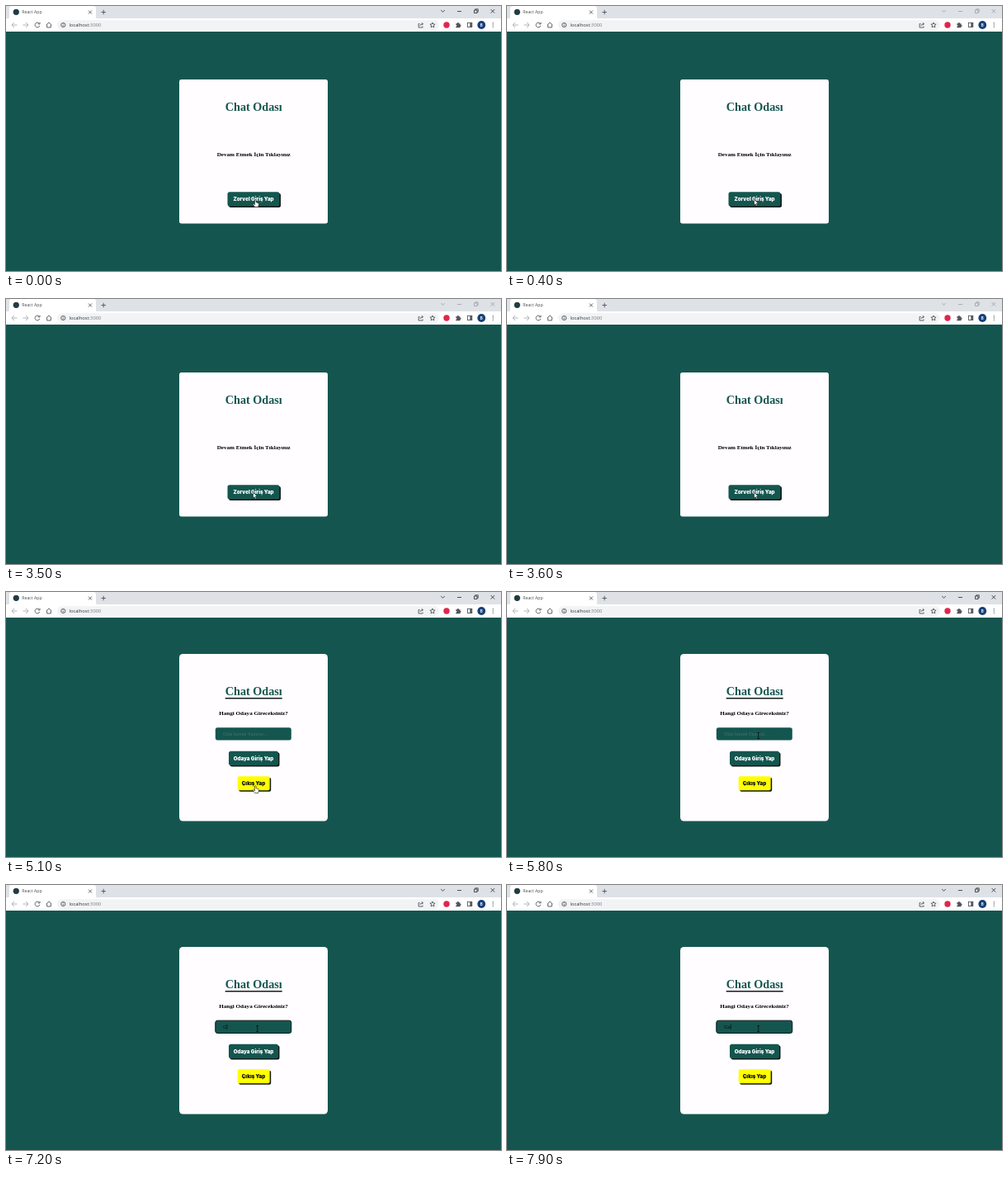
Write an HTML page that moves like this. It is 600 by 321 pixels and loops after 8000 ms.

```html
<!DOCTYPE html>
<html lang="tr">
<head>
<meta charset="utf-8">
<title>Chat Odası</title>
<style>
  html, body { margin: 0; width: 100%; height: 100%; overflow: hidden; background: #14564f; }
  svg { display: block; width: 600px; height: 321px; }
  .ui { font-family: "Open Sans", "Noto Sans", sans-serif; }
  .serif { font: bold 7.1px "Liberation Serif", "Times New Roman", serif; text-anchor: middle; }
  .title { font-size: 14.2px; fill: #14564f; }
  .button { font: 900 6.2px Inter, sans-serif; text-anchor: middle; fill: #fff; }
  .field { font: 5.93px "Liberation Sans", Arial, sans-serif; }
  .line { fill: none; stroke: #50545a; stroke-width: .9; }
</style>
</head>
<body>
<svg viewBox="0 0 600 321">
  <rect width="600" height="321" fill="#14564f"/>

  <!-- Browser frame -->
  <g class="ui">
    <rect width="600" height="16" fill="#dee1e6"/>
    <path d="M1 16Q4 16 4 13V3Q4 0 7 0H106Q109 0 109 3V13Q109 16 112 16Z" fill="#fff"/>
    <rect y="15" width="600" height="16" fill="#fff"/>
    <circle cx="12.3" cy="7.3" r="3.6" fill="#203c42"/>
    <text x="19.3" y="9.4" font-size="5.2" fill="#4a4d51">React App</text>
    <path class="line" d="M100 5.5l4 4m0-4l-4 4M115.5 7.5h5.4m-2.7-2.7v5.4"/>
    <g id="controls" class="line">
      <path d="M527.2 5l2.3 2.3L531.800 5M547 6.500h5M567.500 5h3.500v3.500h-3.500zM568.700 5V3.800h3.500v3.500H571M587.600 4l4.600 4.600m0-4.600l-4.600 4.600"/>
    </g>
    <g class="line">
      <path stroke="#a9acb0" d="M13.500 23H7m3-3l-3 3 3 3M20.500 23H27m-3-3l3 3-3 3"/>
      <path d="M40.300 21.200a2.900 2.900 0 1 0 .5 2.700M41 19.700v2.200h-2.300M48.700 23l3.300-3 3.300 3M49.700 22.500V26h4.600V22.500"/>
    </g>
    <rect x="62" y="17.300" width="463" height="11.500" rx="5.750" fill="#f1f3f4"/>
    <circle class="line" cx="69.300" cy="23" r="2.600" stroke-width=".7"/>
    <path class="line" d="M69.300 22.700v1.900m0-3.400v.7" stroke-width=".7"/>
    <text x="76.500" y="25" font-size="5.750" fill="#303236">localhost<tspan fill="#777b80">:3000</tspan></text>
    <g class="line" stroke-width=".8">
      <path d="M501.500 21.500h-1.400V26h5v-1.400M501.800 24q.3-2.300 3.600-2.300m-1.500-1.500l1.600 1.500-1.600 1.500"/>
      <path d="M517 20l.9 2 2.200.2-1.700 1.500.5 2.200-1.900-1.200-1.900 1.200.5-2.200-1.700-1.500 2.200-.2z"/>
      <rect x="559.400" y="20.300" width="5.400" height="5.200"/>
    </g>
    <path d="M562.300 20.300h2.500v5.200h-2.500z" fill="#50545a"/>
    <circle cx="534" cy="23" r="3.700" fill="#e0264d"/>
    <path d="M545.300 21.200h1.500a1.100 1.100 0 0 1 2.200 0h1.500v1.500a1.100 1.100 0 0 1 0 2.200v1.300h-5.200v-1.300a1 1 0 0 0 0-2.200z" fill="#50545a"/>
    <circle cx="576.300" cy="23" r="4.900" fill="#173f78"/>
    <text x="576.300" y="24.800" font-size="5" font-weight="bold" fill="#dfe7f2" text-anchor="middle">B</text>
    <g fill="#50545a"><circle cx="590.300" cy="20.700" r=".65"/><circle cx="590.300" cy="23" r=".65"/><circle cx="590.300" cy="25.300" r=".65"/></g>
  </g>

  <g id="login">
    <rect x="210" y="89" width="180" height="174.500" rx="2.700" fill="#fffdff"/>
    <text class="serif title" x="300.300" y="127">Chat Odası</text>
    <text class="serif" x="300.200" y="182.300">Devam Etmek İçin Tıklayınız</text>
    <rect x="270" y="226.700" width="63" height="17.300" rx="2.500" fill="#101816"/>
    <rect x="268.500" y="225.200" width="63" height="17.300" rx="2.500" fill="#14564f"/>
    <text class="button" x="300" y="236.200">Zorvel Giriş Yap</text>
  </g>

  <g id="room">
    <rect x="210" y="75" width="180" height="202.500" rx="4.500" fill="#fffdff"/>
    <text class="serif title" x="300.300" y="125">Chat Odası</text>
    <rect x="265.700" y="128" width="69" height="1.500" fill="#141c1b"/>
    <text class="serif" x="300" y="149">Hangi Odaya Gireceksiniz?</text>
    <rect id="input" x="253.800" y="164.200" width="92" height="15.300" rx="2.500" fill="#14564f"/>
    <text id="entry" class="field" x="263" y="173.800"></text>
    <rect id="caret" y="168.500" width=".7" height="6.400" fill="#071210"/>
    <rect x="271.500" y="194.200" width="60" height="17.200" rx="2.500" fill="#101816"/>
    <rect x="270" y="192.700" width="60" height="17.200" rx="2.500" fill="#14564f"/>
    <text class="button" x="300" y="203.700">Odaya Giriş Yap</text>
    <rect x="282.200" y="224.800" width="39" height="17" rx="2" fill="#101816"/>
    <rect x="280.700" y="223.300" width="39" height="17" rx="2" fill="#ff0"/>
    <text class="button" x="300" y="234.200" style="fill:#111">Çıkış Yap</text>
  </g>

  <!-- Each pointer has its hot spot at 0,0 -->
  <g id="pointer" stroke="#111" stroke-width=".6" stroke-linejoin="round">
    <path id="hand" fill="#fff" d="M-.8.500Q0-.500.800.500V3.300L3.700 4.200Q4.300 4.500 4.200 5.500L3.500 9H-.7L-3 5.800Q-2.900 4.500-1.800 5.200L-.8 6.200Z"/>
    <path id="arrow" fill="#fff" d="M0 0V7.200L1.700 5.700 2.800 8.200 4 7.700 2.900 5.300H5Z"/>
    <path id="beam" fill="none" stroke-width=".9" d="M-1.400-3.500H1.400M0-3.500V3.500M-1.400 3.500H1.400"/>
  </g>
</svg>
<script>
const LOOP = 8000, ROOM = 5100, FOCUS = 5900, TYPE_G = 6900, TYPE_A = 7700;
const $ = id => document.getElementById(id);
const show = (id, on) => $(id).style.display = on ? "" : "none";
const within = (v, a, b) => v >= a && v <= b;

function drawInput(t) {
  const focused = t >= FOCUS, typed = t >= TYPE_G;
  const lastKey = t >= TYPE_A ? TYPE_A : typed ? TYPE_G : FOCUS;
  $("input").setAttribute("stroke", focused ? "#0b1715" : "none");
  $("entry").textContent = t >= TYPE_A ? "Ga" : typed ? "G" : "Oda İsmini Yazınız...";
  $("entry").setAttribute("fill", typed ? "#071210" : "#4c716d");
  $("caret").setAttribute("x", typed ? 263 + $("entry").getComputedTextLength() : 263);
  show("caret", focused && (t - lastKey) % 1000 < 500);
}

function drawPointer(t, inRoom) {
  let x = 302.300, y = 234.500, kind = "hand";
  if (inRoom) {
    const p = Math.min(1, (t - ROOM) / 700), k = p * p * (3 - 2 * p);
    x += 2.400 * k;
    y -= 60.500 * k;
    const overButton = within(y, 192.700, 210) || within(y, 223.300, 240.500);
    kind = within(y, 164, 179.500) ? "beam" : overButton ? "hand" : "arrow";
  } else if (t >= 300) {
    [x, y, kind] = [299.500, 234, "arrow"];
  }
  for (const id of ["hand", "arrow", "beam"]) show(id, id === kind);
  $("pointer").setAttribute("transform", `translate(${x} ${y})`);
}

function draw(now) {
  const t = Math.floor((now % LOOP) / 100) * 100;
  const inRoom = t >= ROOM;
  show("login", !inRoom);
  show("room", inRoom);
  $("controls").style.stroke = t < 300 || inRoom ? "#3c4045" : "#a3a6aa";
  if (inRoom) drawInput(t);
  drawPointer(t, inRoom);
}

const start = performance.now();
function tick() {
  draw(performance.now() - start);
  requestAnimationFrame(tick);
}
tick();
</script>
</body>
</html>
```
